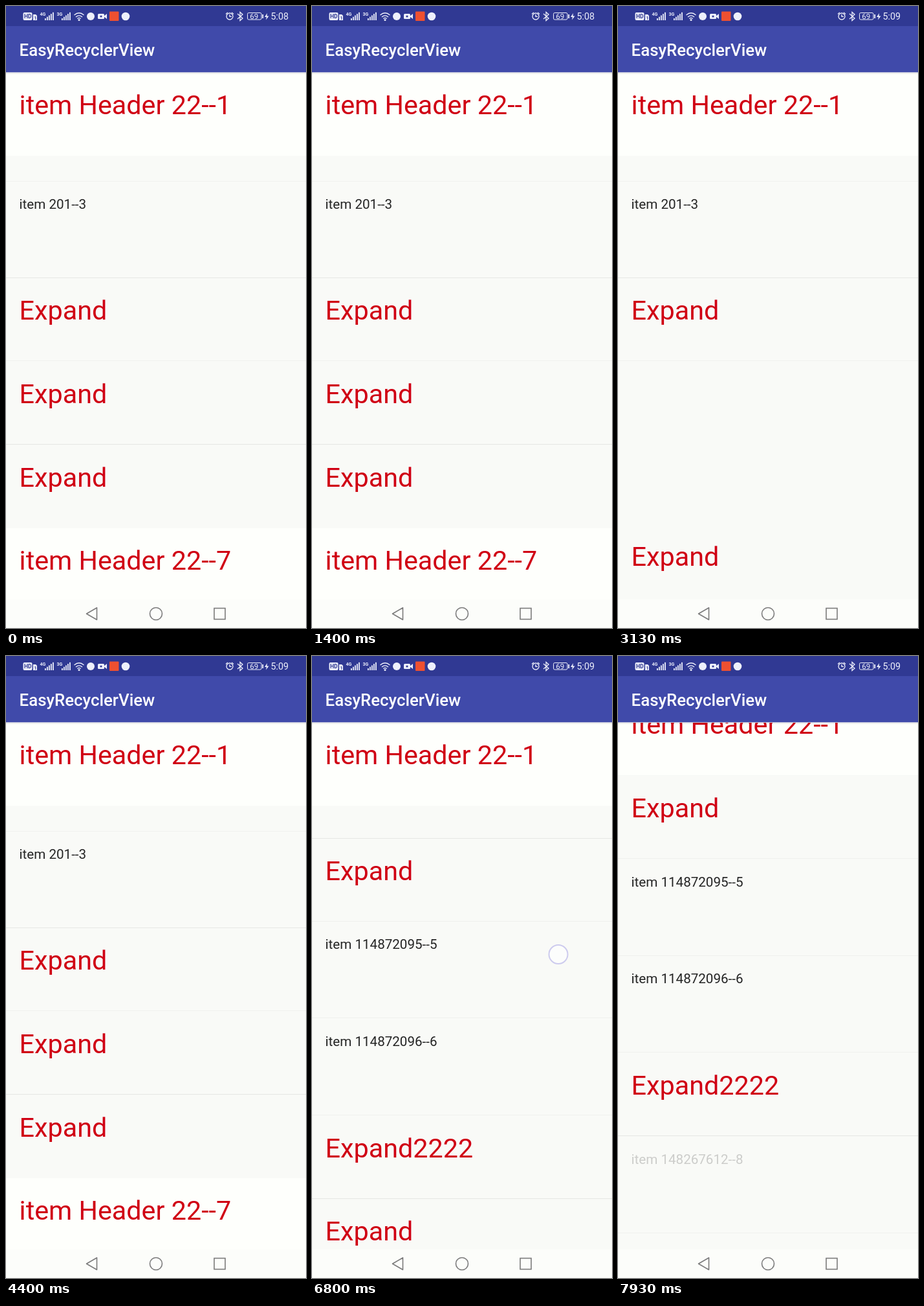
An HTML page for the animation above (8 s loop, 464 by 960 pixels).

```html
<!DOCTYPE html>
<html lang="en">
<head>
<meta charset="utf-8">
<title>EasyRecyclerView</title>
<style>
  html, body { margin: 0; width: 100%; height: 100%; overflow: hidden; background: #f9faf7; }
  svg { display: block; font-family: Roboto, sans-serif; }
  .big { font-size: 41.3px; fill: #d00014; }
  .small { font-size: 20.6px; fill: #242424; }
  .title { font-size: 25.8px; font-weight: 500; fill: #fff; }
  .status { fill: #eef0fb; }
  .line { fill: none; stroke: #eef0fb; stroke-width: 1.3; }
  .nav { fill: none; stroke: #7b7b7b; stroke-width: 1.6; }
</style>
</head>
<body>
<svg width="464" height="960" viewBox="0 0 464 960">
  <rect width="464" height="960" fill="#f9faf7"/>
  <g id="list"></g>
  <g id="sticky">
    <rect y="102" width="464" height="129.5" fill="#fefffc"/>
    <text class="big" x="20.6" y="167">item Header 22--1</text>
  </g>
  <g id="touch">
    <circle cx="381" r="14.5" fill="#fdfdfd" fill-opacity=".7" stroke="#cdcbee" stroke-width="2"/>
  </g>

  <rect y="102" width="464" height="1" fill="#b9bcd8"/>
  <rect y="103" width="464" height="2" fill="#000" opacity=".06"/>
  <rect y="30" width="464" height="72" fill="#404aaa"/>
  <rect width="464" height="31" fill="#303993"/>
  <text class="title" x="20.6" y="76.5">EasyRecyclerView</text>

  <g class="status">
    <rect x="26.5" y="10" width="14" height="12" rx="2"/>
    <text x="28" y="19.3" font-size="8.5" font-weight="700" fill="#303993">HD</text>
    <path d="M42 13h4l2 2v7h-6z"/>
    <text x="43.4" y="20.5" font-size="7" font-weight="700" fill="#303993">1</text>
    <text x="52.5" y="15" font-size="7" font-weight="700">4G</text>
    <text x="78.5" y="15" font-size="7" font-weight="700">3G</text>
    <g id="signals"></g>
    <circle cx="131" cy="16" r="6"/>
    <rect x="142" y="12" width="10" height="8" rx="1.5"/>
    <path d="M151 16l5-4v8z"/>
    <circle cx="147" cy="16" r="1.6" fill="#303993"/>
    <rect x="160" y="8.5" width="14.5" height="14.5" rx="1" fill="#ee5030"/>
    <circle cx="185" cy="16" r="6.3"/>
    <circle cx="113" cy="21.5" r="1.5"/>
    <rect x="396.3" y="13" width="1.8" height="6"/>
    <path d="M404 11l-4 6h3l-1 4.500 4.500-6h-3z"/>
    <text x="377.300" y="20" font-size="11.500">69</text>
    <text id="clock" x="409.500" y="21" font-size="14.300">5:08</text>
  </g>
  <g class="line">
    <path d="M105.500 14q7.500-6.500 15 0M108 17q5-4.300 10 0M110.300 19.500q2.700-2.300 5.400 0"/>
    <circle cx="346" cy="16" r="5"/>
    <path d="M346 13v3.300h3M340 12.500l3-2.500M349 10l3 2.500"/>
    <path d="M358 12l8 7-4 3.500v-13l4 3.500-8 7"/>
    <rect x="373.500" y="10.500" width="21.500" height="10.500" rx="2" stroke-width="1"/>
  </g>

  <rect y="916" width="464" height="44" fill="#fcfdfa"/>
  <g class="nav">
    <path d="M124.500 938l16-9.300v18.600z" stroke-linejoin="round"/>
    <circle cx="232" cy="938" r="9.500"/>
    <rect x="322" y="929.500" width="17" height="17"/>
  </g>
</svg>
<script>
const LOOP = 8000, MOVE = 250, FADE = 120, DRAG = 235;
const byId = id => document.getElementById(id);
const clamp = v => Math.min(1, Math.max(0, v));
const ease = v => 0.5 - Math.cos(Math.PI * clamp(v)) / 2;

function make(parent, tag, attrs, text) {
  const node = document.createElementNS('http://www.w3.org/2000/svg', tag);
  for (const key in attrs) node.setAttribute(key, attrs[key]);
  if (text) node.textContent = text;
  return parent.appendChild(node);
}

for (const left of [60, 86]) {
  for (let i = 0; i < 5; i++) {
    const h = 3 + i * 2.3;
    make(byId('signals'), 'rect', { x: left + i * 3, y: 22 - h, width: 1.8, height: h });
  }
}

// Each entry: time, and whether the group opens or closes
const groupSteps = [
  [[0, false], [1833, true], [2900, false], [4650, true]],
  [[0, false], [7645, true]]
];

// owner: group a row belongs to; push: how far each group moves it down
const rows = [
  { label: '', top: 121 },
  { label: 'item 201--3', top: 270.2, strong: true },
  { label: 'Expand', top: 419.2, big: true },
  { label: 'item 114872095--5', top: 547.8, owner: 0 },
  { label: 'item 114872096--6', top: 697.2, owner: 0 },
  { label: 'Expand2222', top: 847, big: true, owner: 0, strong: true },
  { label: 'item 148267612--8', top: 975.8, owner: 1 },
  { label: 'item 148267613--9', top: 1125.2, owner: 1 },
  { label: 'Expand', top: 547.8, big: true, push: [428, 299], strong: true },
  { label: 'Expand', top: 676.5, big: true, push: [428, 299], strong: true },
  { label: 'item Header 22--7', top: 805.2, big: true, push: [428, 299], white: true }
];

for (const row of rows) {
  const list = byId('list');
  row.height = row.big ? 128.7 : 149.4;
  if (row.white) row.back = make(list, 'rect', { width: 464, height: 129, fill: '#fefffc' });
  row.line = make(list, 'rect', { width: 464, height: 1, fill: row.strong ? '#e6e7e4' : '#f0f1ee' });
  row.text = make(list, 'text', { x: 20.6, class: row.big ? 'big' : 'small' }, row.label);
}

// Rows slide before new ones fade in; old ones fade out before rows slide back
function groupState(steps, t) {
  const [start, open] = steps.filter(step => step[0] <= t).pop();
  const age = t - start;
  if (open) return { shift: ease(age / MOVE), alpha: ease((age - MOVE) / FADE), line: 1 };
  if (start === 0) return { shift: 0, alpha: 0, line: 0 };
  const alpha = 1 - ease(age / FADE);
  return { shift: 1 - ease((age - FADE) / MOVE), alpha, line: alpha };
}

function render(t) {
  const groups = groupSteps.map(steps => groupState(steps, t));
  const scroll = DRAG * ease((t - 6450) / 630);

  for (const row of rows) {
    const push = row.push || [0, 0];
    const y = row.top - scroll + push[0] * groups[0].shift + push[1] * groups[1].shift;
    const owner = groups[row.owner] || { alpha: 1, line: 1 };
    row.text.setAttribute('y', y + (row.big ? 65 : 43));
    row.text.setAttribute('opacity', owner.alpha);
    row.line.setAttribute('y', Math.floor(y + row.height));
    row.line.setAttribute('opacity', owner.line);
    if (row.back) row.back.setAttribute('y', y);
  }

  const lift = Math.min(0, 419.2 - scroll - 231);
  byId('sticky').setAttribute('transform', `translate(0 ${lift})`);
  byId('touch').setAttribute('transform', `translate(0 ${364 + DRAG - scroll})`);
  byId('touch').setAttribute('opacity', t >= 6400 && t < 7190 ? 1 : 0);
  byId('clock').textContent = t < 3100 ? '5:08' : '5:09';
}

const begin = performance.now();
function tick() {
  render((performance.now() - begin) % LOOP);
  requestAnimationFrame(tick);
}
tick();
</script>
</body>
</html>
```
